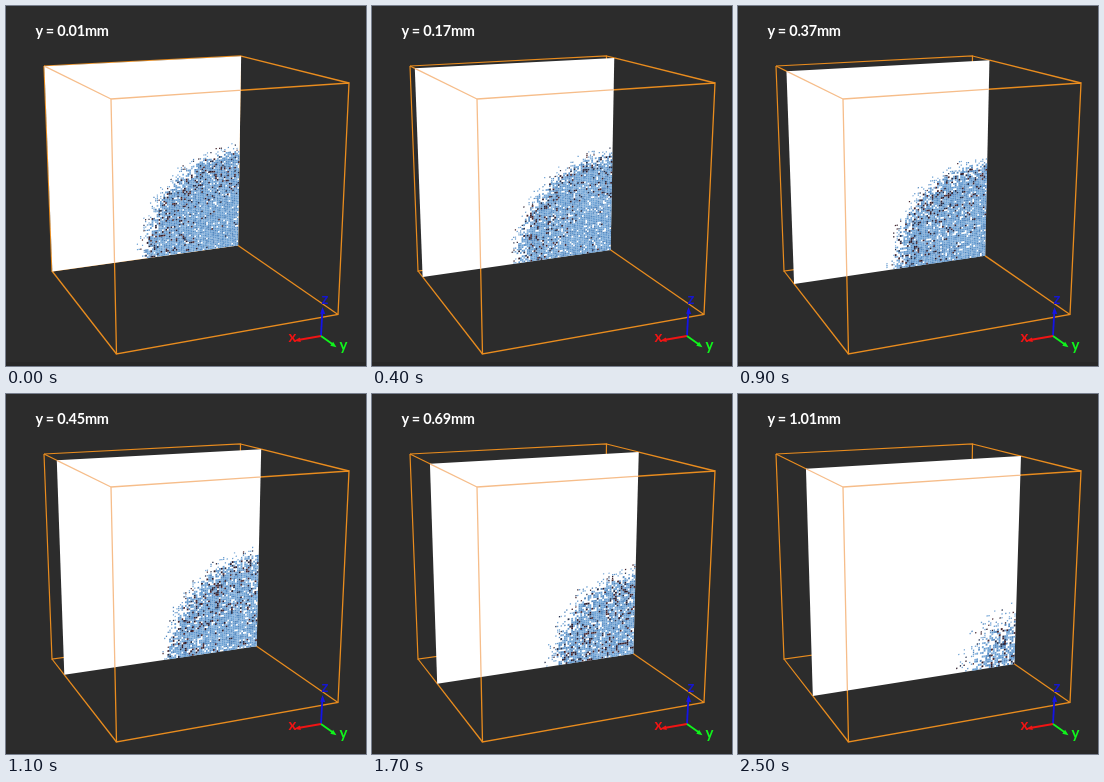
Animation, 360 px wide and 360 px high, one loop 2.6 s. Source, as an HTML page with a canvas:

```html
<!DOCTYPE html>
<html lang="en">
<head>
<meta charset="utf-8">
<title>Slice through a particle cloud</title>
<style>
  html, body { margin: 0; width: 100%; height: 100%; overflow: hidden; background: #2c2c2c; }
  canvas, svg { position: absolute; left: 0; top: 0; width: 360px; height: 360px; }
  text { font: 700 15px Lato, "Open Sans", sans-serif; }
  #label { font-size: 14.5px; letter-spacing: -0.25px; }
</style>
</head>
<body>
<canvas id="stage" width="360" height="360"></canvas>
<svg viewBox="0 0 360 360">
  <g fill="none" stroke-width="1.8">
    <path d="M315 330L316.4 304" stroke="#1414e6"/>
    <path d="M315 330L292 334" stroke="#f01414"/>
    <path d="M315 330L327 338.5" stroke="#10f41c"/>
  </g>
  <path d="M316.6 301l2.6 7l-5 -.3z" fill="#1414e6"/>
  <path d="M288 334.7l6 -3.2l.8 4.4z" fill="#f01414"/>
  <path d="M330.5 341.3l-6.2 -1.6l2.8 -4z" fill="#10f41c"/>
  <text x="315.5" y="297.5" fill="#1616d0">z</text>
  <text x="282.5" y="335.8" fill="#f01414">x</text>
  <text x="333.5" y="343.8" fill="#10f41c">y</text>
  <text id="label" x="29.5" y="30.2" fill="#fff">y = 0.01mm</text>
</svg>
<script>
const ctx = document.getElementById('stage').getContext('2d');
const label = document.getElementById('label');
const STEPS = 26, STEP_MS = 100, CELLS = 110, RADIUS = 0.52, DEPTH = 0.461;

// corners in order: top left, top right, bottom right, bottom left
const back = [[38, 60], [234.5, 50], [231.5, 239], [46, 265]];
const front = [[105, 93], [343, 77], [332, 308.5], [110.5, 348]];
const blues = ['#6a9fd2', '#6a9fd2', '#70a4d6', '#5f95cb', '#5286bd', '#86b0da'];
const darks = ['#2a1a2a', '#45242c', '#24304e'];

const mix = (p, q, t) => [p[0] + (q[0] - p[0]) * t, p[1] + (q[1] - p[1]) * t];
const clamp = v => Math.max(0, Math.min(1, v));

function random(seed) {
  return () => {
    seed = (seed + 0x6D2B79F5) | 0;
    let t = Math.imul(seed ^ seed >>> 15, 1 | seed);
    t = t + Math.imul(t ^ t >>> 7, 61 | t) ^ t;
    return ((t ^ t >>> 14) >>> 0) / 4294967296;
  };
}

function trace(points) {
  ctx.beginPath();
  points.forEach(p => ctx.lineTo(p[0], p[1]));
}

function line(...points) {
  trace(points);
  ctx.stroke();
}

function fill(points, color) {
  trace(points);
  ctx.fillStyle = color;
  ctx.fill();
}

function drawCloud([tl, tr, br, bl], u, seed) {
  const rnd = random(seed);
  const z = DEPTH * u;
  // a runs left and b runs up from the bottom right corner
  const at = (a, b) => mix(mix(br, bl, a), mix(tr, tl, a), b);
  const n = Math.ceil(CELLS * RADIUS * 1.08);
  for (let j = 0; j < n; j++) {
    for (let i = 0; i < n; i++) {
      const chance = rnd(), shade = rnd(), pick = rnd();
      const a = (i + 0.5) / CELLS, b = (j + 0.5) / CELLS;
      const rho = Math.hypot(a, b, z) / RADIUS;
      const density = (0.93 - 0.1 * u) * clamp((1.06 - rho) / 0.2);
      if (chance > density) continue;
      const dark = shade < 0.02 + 0.17 * clamp((rho - 0.4) / 0.45);
      const set = dark ? darks : blues;
      const h = (rho > 0.97 ? 0.35 : 0.5) / CELLS;
      fill([at(a - h, b - h), at(a + h, b - h), at(a + h, b + h), at(a - h, b + h)],
        set[Math.floor(pick * set.length)]);
    }
  }
}

function drawFront(plane, color) {
  ctx.strokeStyle = color;
  ctx.lineWidth = 1.3;
  line(...front, front[0]);
  plane.forEach((p, i) => line(p, front[i]));
}

function draw(step) {
  const u = step / (STEPS - 1);
  const t = 0.006 + 0.441 * u / (1 + 0.09 * (1 - u));
  const plane = back.map((p, i) => mix(p, front[i], t));

  ctx.fillStyle = '#2c2c2c';
  ctx.fillRect(0, 0, 360, 360);
  ctx.fillStyle = '#282828';
  ctx.fillRect(0, 356, 360, 4);

  ctx.strokeStyle = '#e98c1e';
  ctx.lineWidth = 1.2;
  line(...back, back[0]);
  back.forEach((p, i) => line(p, plane[i]));
  drawFront(plane, '#e98c1e');
  fill(plane, '#fff');
  drawCloud(plane, u, 977 + step * 7919);

  // the front edges look paler where they cross the white slice
  ctx.save();
  trace(plane);
  ctx.clip();
  drawFront(plane, '#f6bd8a');
  ctx.restore();

  label.textContent = `y = ${(0.01 + 0.04 * step).toFixed(2)}mm`;
}

let shown = -1;
function tick() {
  const step = Math.floor(performance.now() / STEP_MS) % STEPS;
  if (step !== shown) draw(shown = step);
  requestAnimationFrame(tick);
}
tick();
</script>
</body>
</html>
```
